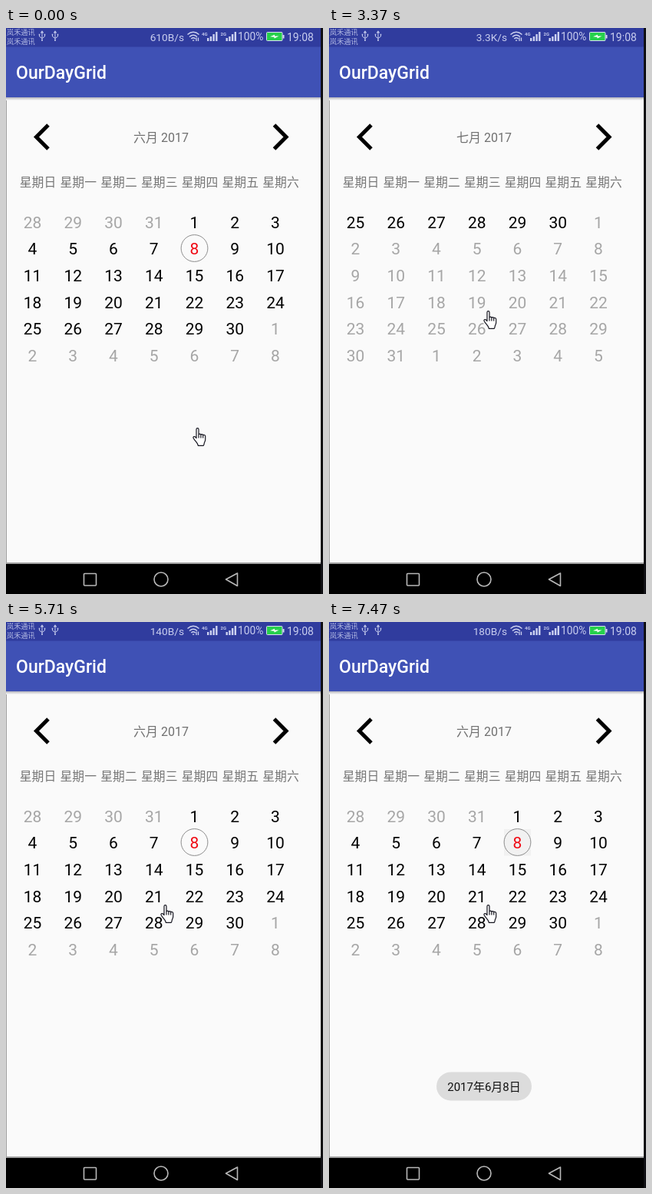
These frames come from a looping animation (413x735 px, 8 s). An HTML page:

```html
<!DOCTYPE html>
<html lang="zh-CN">
<head>
<meta charset="utf-8">
<style>
html, body { margin: 0; width: 100%; height: 100%; overflow: hidden; background: #fafafa; }
svg { display: block; width: 100%; height: 100%; }
text { font-family: Roboto, "Noto Sans CJK SC", "Noto Sans CJK", sans-serif; }
</style>
</head>
<body>
<svg id="stage" viewBox="0 0 413 735">
  <defs>
    <linearGradient id="shade" x2="0" y2="1">
      <stop stop-color="#b4b4ba"/><stop offset="1" stop-color="#fafafa"/>
    </linearGradient>
    <g id="usb" fill="none" stroke="#c3c9ec">
      <path d="M0 5V16M-3.5 8.5V11L0 13.5L3.5 11V8.5"/>
      <path d="M-1.5 6.5L0 4.5L1.5 6.5M-1 16h2M-4.3 8.5h1.6M2.7 8.5h1.6" stroke-width="1.4"/>
    </g>
    <path id="bars" d="M0 13h2.4v4H0zM3.7 11h2.4v6H3.7zM7.4 8h2.4v9H7.4zM11.1 5h2.4v12h-2.4z" fill="#cdd2f0"/>
  </defs>
  <rect width="413" height="735" fill="#fafafa"/>
  <rect width="410" height="25" fill="#303c9e"/>
  <rect y="24.5" width="410" height="66" fill="#3f51b5"/>
  <rect y="90" width="410" height="4" fill="url(#shade)"/>
  <rect y="94" width="1" height="601" fill="#a0a0a0"/>
  <rect y="694" width="410" height="2" fill="#a2a2a2"/>
  <rect y="696" width="410" height="39" fill="#000"/>
  <rect x="410" width="3" height="735" fill="#101014"/>

  <use href="#usb" x="47"/><use href="#usb" x="64"/>
  <g fill="none" stroke="#cdd2f0" stroke-width="1.5">
    <path d="M236.5 8.5q7.5-6.5 15 0M239 11.5q5-4.5 10 0M241.3 14q2.7-2.5 5.4 0"/>
    <path d="M243 16.2h2.2M248 12.5v4.5M250.5 12.5v4.5" stroke-width="1.3"/>
  </g>
  <use href="#bars" x="262"/><use href="#bars" x="286.5"/>
  <rect x="339.5" y="5.5" width="20.5" height="11" rx="1" fill="#26d04c" stroke="#d8dcf3"/>
  <path d="M360.5 9h2v4.500h-2z" fill="#d8dcf3"/>
  <path d="M344 11.200l6-2.500v1.700h5.500l-6 3v-1.700z" fill="#fff"/>

  <g fill="none" stroke="#000" stroke-width="5">
    <path d="M55 126L39.500 141.500L55 157"/><path d="M349.500 126L365 141.500L349.500 157"/>
  </g>
  <g fill="none" stroke="#b8b8b8" stroke-width="1.600">
    <rect x="101.500" y="708.500" width="16" height="15.500" rx="1"/>
    <circle cx="202" cy="716" r="9"/>
    <path d="M286.500 716L301.500 708V724.500Z" stroke-linejoin="round"/>
  </g>

  <g id="labels"></g>
  <g id="june">
    <rect id="press" x="228" y="269" width="35" height="34.500"/>
    <circle cx="245.500" cy="286" r="17.400" fill="none" stroke="#808080" stroke-width=".9"/>
  </g>
  <g id="july"></g>
  <g id="toast">
    <rect x="140" y="584.500" width="124" height="37" rx="18.500" fill="#dcdcdc"/>
  </g>
  <path id="hand" fill="#fff" stroke="#15151f" stroke-width="1.200" stroke-linejoin="round"
    d="M5 13.500V2.200a1.500 1.500 0 0 1 3 0V9c.4-1.300 2.600-1.200 2.900.3.5-1.100 2.500-.8 2.800.6.6-.9 3-.6 3 1.300V15.500c0 2.700-1.700 3.500-1.700 6.300l-.8 1.500H7.300L6.500 21C5.300 18.500 2.600 16.500 1 13.200.6 11.600 2.600 11 3.600 12zM8 9v4.500M10.900 9.500v4M13.700 10v3.500"/>
</svg>
<script>
const $ = id => document.getElementById(id);

function text(parent, str, x, y, size, fill, anchor = "middle", weight = 400) {
  const el = document.createElementNS("http://www.w3.org/2000/svg", "text");
  const attrs = { x, y, fill, "font-size": size, "text-anchor": anchor, "font-weight": weight };
  for (const name in attrs) el.setAttribute(name, attrs[name]);
  el.textContent = str;
  parent.append(el);
  return el;
}

const labels = $("labels"), pale = "#c8cdee";
text(labels, "岚禾通讯", 1, 8.5, 9.2, "#b4bbe4", "start");
text(labels, "岚禾通讯", 1, 20.5, 9.2, "#b4bbe4", "start");
text(labels, "4G", 255, 9.5, 6, pale, "start", 700);
text(labels, "2G", 279.5, 9.5, 6, pale, "start", 700);
text(labels, "100%", 302, 16, 13.8, pale, "start");
text(labels, "19:08", 366, 16.5, 14, pale, "start");
text(labels, "OurDayGrid", 13, 66, 23, "#fff", "start", 500);
const speed = text(labels, "", 232, 16.5, 13.7, pale, "end");
const month = text(labels, "", 202, 148, 16, "#707070");
[..."日一二三四五六"].forEach((day, i) =>
  text(labels, "星期" + day, 41.5 + i * 52.75, 205.8, 15.8, "#757575"));
text($("toast"), "2017年6月8日", 202, 608.5, 15, "#111");

// 42 days from `first`, wrapping at each month length
function drawMonth(group, first, lengths, isDark, today) {
  let day = first, part = 0;
  for (let i = 0; i < 42; i++) {
    const fill = i === today ? "#f00a14" : isDark(part) ? "#000" : "#a6a6a6";
    text(group, day, 34.5 + i % 7 * 52.75, 259.6 + Math.floor(i / 7) * 34.7, 21, fill);
    if (++day > lengths[part]) { day = 1; part++; }
  }
}
drawMonth($("june"), 28, [31, 30, 31], part => part === 1, 11);
drawMonth($("july"), 25, [30, 31, 31], part => part === 0);

// Each row: start time in ms, value
const speeds = [[0, "610B/s"], [780, "3.3K/s"], [3770, "140B/s"], [6790, "180B/s"]];
const months = [[0, "june"], [3370, "july"], [5710, "june"]];
const hands = [[0, [243, 519]], [120, [196, 409]], [270, [187, 399]],
  [390, [189, 385]], [510, [196, 373]], [630, [201, 367]]];
const presses = [[0, "#fafafa"], [6790, "#e7e7e7"], [7350, "#ececec"], [7470, "#f1f1f1"]];
const toasts = [[0, 0], [7350, 0.45], [7470, 1]];
const at = (steps, t) => steps.findLast(step => step[0] <= t)[1];

const start = performance.now();
function draw() {
  const t = Math.max(0, performance.now() - start) % 8000;
  const shown = at(months, t);
  speed.textContent = at(speeds, t);
  month.textContent = (shown === "june" ? "六月" : "七月") + " 2017";
  for (const id of ["june", "july"]) $(id).style.display = id === shown ? "" : "none";
  $("hand").setAttribute("transform", `translate(${at(hands, t)})`);
  $("press").setAttribute("fill", at(presses, t));
  $("toast").style.opacity = at(toasts, t);
  requestAnimationFrame(draw);
}
draw();
</script>
</body>
</html>
```
